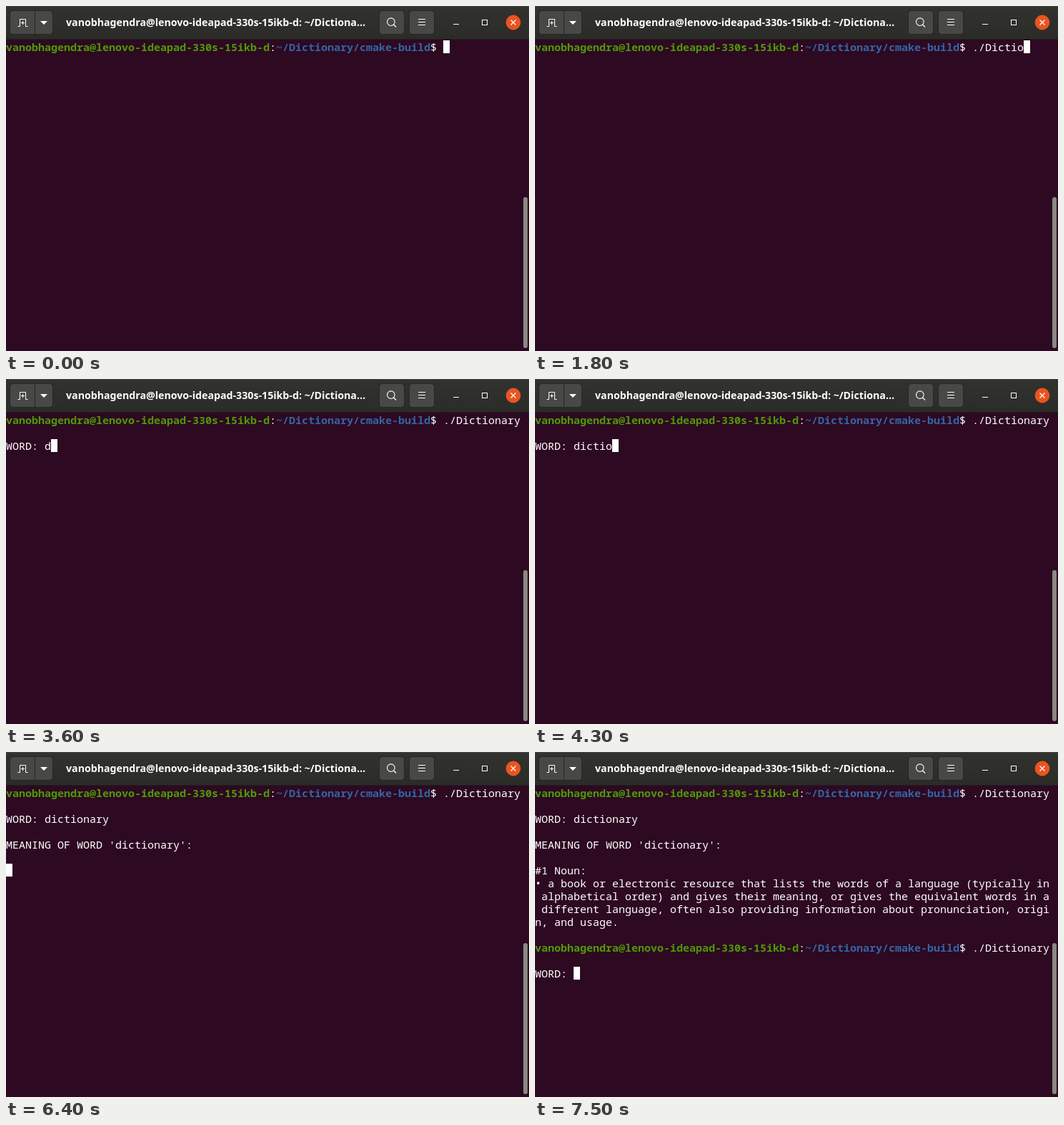
An HTML page with a canvas that plays this animation: 732x482 px, repeating every 8000 ms.

```html
<!DOCTYPE html>
<html lang="en">
<head>
<meta charset="utf-8">
<title>Terminal</title>
<style>
  html, body { margin: 0; width: 100%; height: 100%; overflow: hidden; background: #2d0922; }
  canvas { display: block; width: 732px; height: 482px; }
</style>
</head>
<body>
<canvas id="stage" width="732" height="482"></canvas>
<script>
const ctx = document.getElementById('stage').getContext('2d', { alpha: false });
const LOOP = 8000;
const CELL_W = 9, CELL_H = 18, TOP = 48, BASE = 15;
const MONO = '15px "Noto Sans Mono", "DejaVu Sans Mono", monospace';
const COLOR = { bg: '#2d0922', text: '#ffffff', user: '#4e9a06', path: '#3465a4' };

const USER = 'vanobhagendra@lenovo-ideapad-330s-15ikb-d';
const PATH = '~/Dictionary/cmake-build';
const PROMPT_END = 68;
const COMMAND = './Dictionary';
const WORD = 'dictionary';
const MEANING = [
  '#1 Noun:',
  '• a book or electronic resource that lists the words of a language (typically in',
  ' alphabetical order) and gives their meaning, or gives the equivalent words in a',
  ' different language, often also providing information about pronunciation, origi',
  'n, and usage.'
];

// [time, letters typed]
const COMMAND_KEYS = [[500, 2], [1300, 4], [1400, 5], [1600, 6], [1800, 8],
  [2000, 9], [2100, 10], [2300, 11], [2400, 12]];
const WORD_KEYS = [[3600, 1], [3800, 2], [3900, 3], [4100, 4], [4200, 5],
  [4300, 6], [4500, 7], [4700, 8], [4800, 9], [4900, 10]];

function typed(keys, t) {
  let count = 0;
  for (const [time, letters] of keys) if (t >= time) count = letters;
  return count;
}

function rect(x, y, w, h, color) {
  ctx.fillStyle = color;
  ctx.fillRect(x, y, w, h);
}

function rounded(x, y, w, h, radii, color) {
  ctx.fillStyle = color;
  ctx.beginPath();
  ctx.roundRect(x, y, w, h, radii);
  ctx.fill();
}

function line(points, width = 1, color = '#ffffff') {
  ctx.strokeStyle = color;
  ctx.lineWidth = width;
  ctx.beginPath();
  points.forEach(([x, y], i) => i ? ctx.lineTo(x, y) : ctx.moveTo(x, y));
  ctx.stroke();
}

function circle(x, y, r) {
  ctx.beginPath();
  ctx.arc(x, y, r, 0, Math.PI * 2);
}

function put(text, col, row, color = COLOR.text, bold = false) {
  ctx.font = (bold ? 'bold ' : '') + MONO;
  ctx.fillStyle = color;
  [...text].forEach((ch, i) => {
    if (ch !== ' ') ctx.fillText(ch, (col + i) * CELL_W, TOP + row * CELL_H + BASE);
  });
}

function prompt(row, command) {
  put(USER, 0, row, COLOR.user, true);
  put(':', USER.length, row);
  put(PATH, USER.length + 1, row, COLOR.path, true);
  put('$ ' + command, PROMPT_END - 2, row);
}

function cursor(col, row) {
  rect(col * CELL_W, TOP + row * CELL_H, CELL_W, CELL_H, '#ffffff');
}

function button(x, w, radii = 4) {
  rounded(x, 6, w, 34, radii, '#272725');
  rounded(x + 1, 7, w - 2, 32, radii, '#484846');
}

function header() {
  const shade = ctx.createLinearGradient(0, 0, 0, 46);
  shade.addColorStop(0, '#32322f');
  shade.addColorStop(1, '#2b2b28');
  rect(0, 0, 732, 46, shade);
  rect(0, 0, 732, 1, '#474541');
  rect(0, 46, 732, 1, '#1f1e1c');

  button(5, 36, [4, 0, 0, 4]);
  button(40, 26, [0, 4, 4, 0]);
  button(522, 36);
  button(564, 36);

  // new tab and its menu arrow
  line([[16.5, 28.5], [19.5, 28.5], [19.5, 18.5], [27.5, 18.5], [27.5, 28.5], [30.5, 28.5]]);
  line([[21, 23.5], [26, 23.5]]);
  line([[23.5, 21], [23.5, 26]]);
  ctx.fillStyle = '#ffffff';
  ctx.beginPath();
  ctx.moveTo(48, 21);
  ctx.lineTo(58, 21);
  ctx.lineTo(53, 26);
  ctx.fill();

  ctx.font = 'bold 14.2px "Noto Sans", "Open Sans", sans-serif';
  ctx.fillText(USER + ': ~/Dictiona…', 84, 28);

  // search
  ctx.strokeStyle = '#ffffff';
  ctx.lineWidth = 1.1;
  circle(538.8, 22.2, 5.3);
  ctx.stroke();
  line([[542.5, 26], [546, 29.5]], 1.2);

  // menu
  for (const y of [18, 22, 26]) rect(577, y, 10, 1, '#ffffff');

  // window controls
  rect(626, 25, 8, 1, '#ffffff');
  ctx.lineWidth = 1;
  ctx.strokeRect(666.5, 19.5, 7, 7);
  ctx.fillStyle = '#e95420';
  circle(710, 23, 10.4);
  ctx.fill();
  line([[706.5, 19.5], [713.5, 26.5]], 1.2);
  line([[713.5, 19.5], [706.5, 26.5]], 1.2);
}

function session(t) {
  const keys = typed(COMMAND_KEYS, t);
  prompt(0, COMMAND.slice(0, keys));
  if (t < 2400) return cursor(PROMPT_END + keys, 0);
  if (t < 2800) return cursor(0, 1);

  const letters = typed(WORD_KEYS, t);
  put('WORD: ' + WORD.slice(0, letters), 0, 2);
  if (t < 5200) {
    if (t < 3300 || t >= 3600) cursor(6 + letters, 2);
    return;
  }
  if (t < 5300) return cursor(0, 3);

  put("MEANING OF WORD '" + WORD + "':", 0, 4);
  if (t < 7000) {
    if (t < 5800 || t >= 6400) cursor(0, 6);
    return;
  }

  MEANING.forEach((text, i) => put(text, 0, 6 + i));
  if (t < 7100) return cursor(0, 12);
  if (t < 7500) {
    prompt(12, '');
    return cursor(PROMPT_END, 12);
  }
  prompt(12, COMMAND);
  put('WORD: ', 0, 14);
  cursor(6, 14);
}

function draw(t) {
  rect(0, 0, 732, 482, COLOR.bg);
  header();
  session(t);
  rounded(724, 267, 6, 211, 3, '#8c8784');
}

const start = performance.now();
function tick() {
  draw((performance.now() - start) % LOOP);
  requestAnimationFrame(tick);
}
tick();
</script>
</body>
</html>
```
